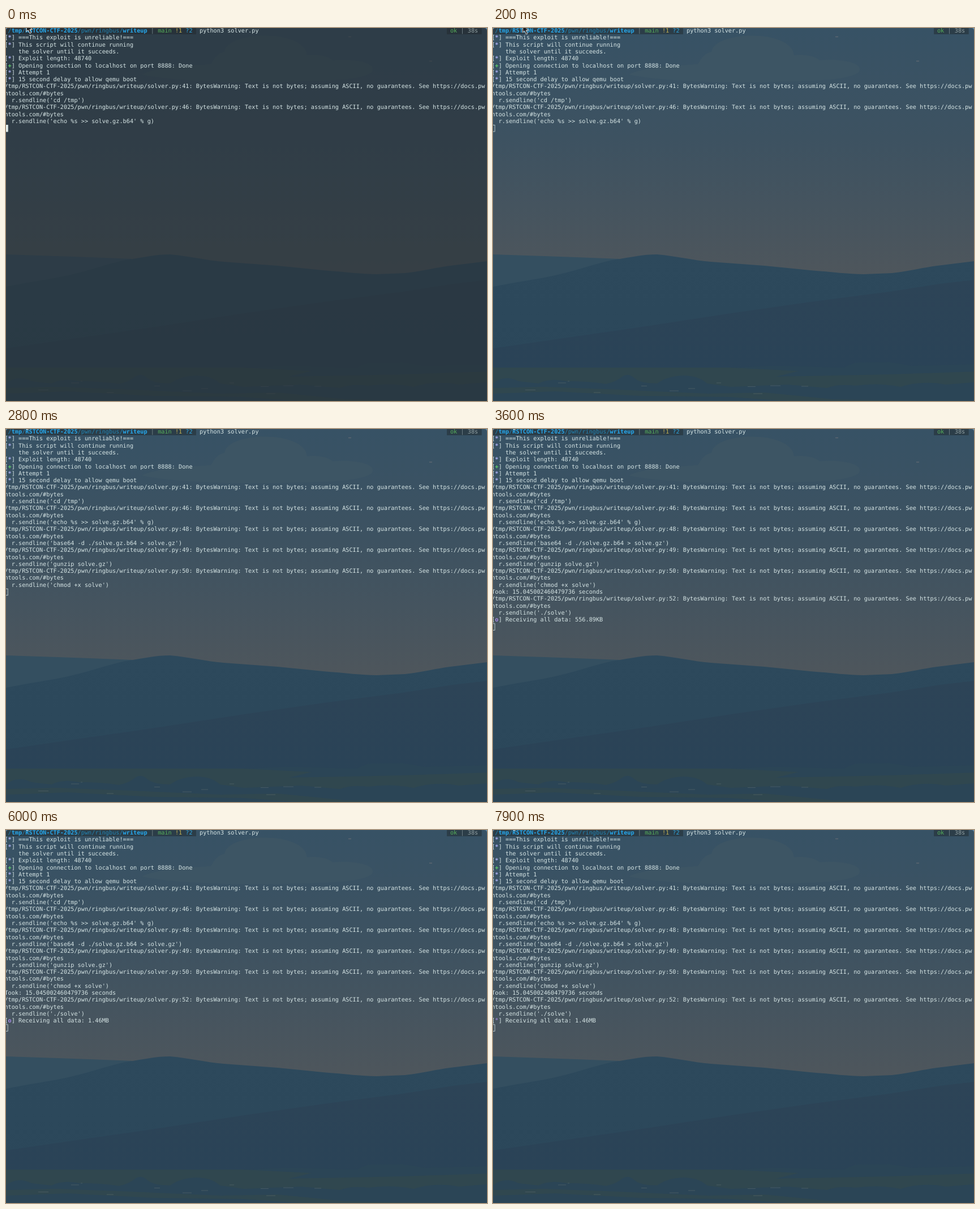
Recreate the animation shown at these times as an HTML page. Size 850 px wide and 659 px high, loop 8 s.

```html
<!DOCTYPE html>
<html lang="en">
<head>
<meta charset="utf-8">
<title>solver.py</title>
<style>
  html, body { margin: 0; width: 100%; height: 100%; overflow: hidden; background: #2b4457; }
  #stage { position: relative; width: 850px; height: 659px; overflow: hidden; }
  #stage > * { position: absolute; left: 0; top: 0; }
  #dim { width: 850px; height: 659px; background: rgba(42,50,57,.64); animation: dim 8s step-end infinite; }
  #term {
    margin: 0; transform-origin: 0 0;
    transform: translate(-2.6px, -.5px) scale(.7694);
    font: 13.29px/16px "DejaVu Sans Mono", monospace;
    font-variant-ligatures: none; text-rendering: geometricPrecision;
    color: #d6e5e5; white-space: pre;
  }
  b { color: #27a9ee; }
  .bar { background: rgba(32,41,44,.5); }
  .dir { color: #2385b4; }
  .sep { color: #75868a; }
  .git { color: #57b05c; }
  .mod { color: #c4b252; }
  .new { color: #2fa6de; }
  .info { color: #a9aef0; font-weight: bold; }
  .good { color: #5fd068; font-weight: bold; }
  .spin { color: #a78be6; font-weight: bold; }
  #caret {
    display: inline-block; box-sizing: border-box; width: 8px; height: 16px; vertical-align: top;
    position: relative; top: -1px;
    border: 1.3px solid #d6e5e5; animation: caret 8s step-end infinite;
  }
  #mouse { overflow: visible; animation: mouse 8s step-end infinite; }
  @keyframes dim { 0% { opacity: 1 } 2.5%, 100% { opacity: 0 } }
  @keyframes caret { 0% { background: #e2ecec } 2.5%, 100% { background: transparent } }
  @keyframes mouse {
    0% { transform: translate(36px, -7px) }
    1.25% { transform: translate(44.5px, -.5px) }
    2.5% { transform: translate(52.5px, -5.5px) }
    10% { transform: translate(56px, -7px) }
    11.25% { transform: translate(36px, -9px) }
    18.75% { transform: translate(43px, -9px) }
    20% { transform: translate(36px, -11px) }
    21.25%, 100% { transform: translate(31px, -15px) }
  }
</style>
</head>
<body>
<div id="stage">
  <svg width="850" height="659" viewBox="0 0 850 659">
    <defs>
      <linearGradient id="sky" x1="0" y1="0" x2="0" y2="435" gradientUnits="userSpaceOnUse">
        <stop offset="0" stop-color="#375265"/>
        <stop offset=".45" stop-color="#3d5261"/>
        <stop offset=".72" stop-color="#45545f"/>
        <stop offset="1" stop-color="#4e565c"/>
      </linearGradient>
      <linearGradient id="ridge" x1="0" y1="400" x2="0" y2="600" gradientUnits="userSpaceOnUse">
        <stop offset="0" stop-color="#2d495c"/>
        <stop offset="1" stop-color="#2b475a"/>
      </linearGradient>
      <linearGradient id="slope" x1="0" y1="445" x2="0" y2="600" gradientUnits="userSpaceOnUse">
        <stop offset="0" stop-color="#2d4457"/>
        <stop offset="1" stop-color="#2a4357"/>
      </linearGradient>
    </defs>
    <path fill="url(#sky)" d="M0 0H850V659H0Z"/>
    <path fill="#3d5564" d="M240 82C270 68 330 66 362 64C370 52 372 46 386 42C392 4 528 2 532 48
      C552 46 570 50 577 57C620 54 650 62 648 74C645 92 560 94 525 94C440 98 300 96 240 82Z"/>
    <path stroke="#5b6670" stroke-width="1.5" d="M605 15.5h5M748 58.5h5"/>
    <path fill="#344f60" d="M0 400L120 404 225 408 270 470H0Z"/>
    <path fill="url(#ridge)" d="M0 457C40 449 70 445 100 439C140 431 175 418 210 410C240 406 262 400 290 400
      C325 403 350 410 385 413L480 420 560 428C600 431 630 435 655 435L705 433C735 430 755 424 785 420L850 412V659H0Z"/>
    <path fill="url(#slope)" d="M850 445L790 452 700 466 560 484 420 504 250 530 0 566V659H850Z"/>
    <path fill="#30474f" d="M0 600H420L520 603 850 598V659H0Z"/>
    <g fill="#2b4556">
      <path d="M420 600L500 597 620 600 640 591 700 590 740 597 850 594V607L700 612 500 616 540 606Z"/>
      <path d="M0 628Q20 612 45 624L80 628Q100 618 130 624Q170 624 200 629Q220 624 228 616Q238 609 248 617Q258 628 290 628
        Q310 614 338 614Q365 615 378 628L420 634 520 630 590 636Q610 628 640 632Q680 626 720 634Q760 622 800 630L850 626V659H760
        L600 656 480 644 380 646 200 638 90 634 0 636Z"/>
      <path d="M0 646L110 642 260 650 420 652 520 659H0Z"/>
    </g>
    <path fill="none" stroke="#5c6a6d" stroke-width="1.2" opacity=".55"
      d="M57 639.500h18M115 627h14M132 624h3M178 644h12M262 632.500h10M312 641h16M345 637h12M395 627h8M450 633.500h14M490 632h18M545 633h12M460 646h16"/>
  </svg>
  <div id="dim"></div>
  <pre id="term"><span class="bar"> <span class="dir">/<b>tmp</b>/<b>RSTCON-CTF-2025</b>/pwn/ringbus/<b>writeup</b></span> <span class="sep">|</span> <span class="git">main</span> <span class="mod">!1</span> <span class="new">?2</span> </span> python3 solver.py<span id="gap"></span><span class="bar"> <span class="git">ok</span> <span class="sep">|</span> <span style="color:#92a1a3">38s</span> </span>
<span id="out"></span><span id="caret"></span></pre>
  <svg width="850" height="6" fill="#6695b8"><path d="M0 0H4Q0 0 0 4ZM850 0V5Q850 0 845 0Z"/></svg>
  <svg id="mouse" width="12" height="18">
    <path d="M0 0V13.5L3.2 10.600 6 16.500 8.600 15.300 6 9.600H10.500Z" fill="#1a1d20" stroke="#f4f6f6"/>
  </svg>
</div>
<script>
  const out = document.getElementById('out');
  document.getElementById('gap').textContent = ' '.repeat(54);

  const tag = (kind, mark, text) => `[<span class="${kind}">${mark}</span>] ${text}\n`;
  const warn = (line, cmd) =>
    `/tmp/RSTCON-CTF-2025/pwn/ringbus/writeup/solver.py:${line}: BytesWarning: Text is not bytes; ` +
    `assuming ASCII, no guarantees. See https://docs.pw\nntools.com/#bytes\n  r.sendline(${cmd})\n`;

  const intro =
    tag('info', '*', '===This exploit is unreliable!===') +
    tag('info', '*', 'This script will continue running') +
    '    the solver until it succeeds.\n' +
    tag('info', '*', 'Exploit length: 48740') +
    tag('good', '+', 'Opening connection to localhost on port 8888: Done') +
    tag('info', '*', 'Attempt 1') +
    tag('info', '*', '15 second delay to allow qemu boot') +
    warn(41, "'cd /tmp'") +
    warn(46, "'echo %s &gt;&gt; solve.gz.b64' % g");
  const unpack =
    warn(48, "'base64 -d ./solve.gz.b64 &gt; solve.gz'") +
    warn(49, "'gunzip solve.gz'") +
    warn(50, "'chmod +x solve'");
  const launch = 'Took: 15.045002460479736 seconds\n' + warn(52, "'./solve'");
  const spinner = ['o', '°', ' ', ' ', '_', '.'];

  // Received kilobytes at a tick of 100 ms
  function received(tick) {
    const kb = tick <= 36 ? 556.89 * (tick - 29) / 7
                          : 556.89 + 52.15 * (Math.min(tick, 54) - 36);
    if (kb <= 0) return '0B';
    return kb < 1024 ? kb.toFixed(2) + 'KB' : (kb / 1024).toFixed(2) + 'MB';
  }

  function screen(tick) {
    let s = intro;
    if (tick >= 28) s += unpack;
    if (tick >= 29) s += launch + tag('spin', spinner[tick % 6], 'Receiving all data: ' + received(tick));
    return s;
  }

  const start = performance.now();
  let shown = '';
  function draw(now) {
    const s = screen(Math.floor(Math.max(0, now - start) % 8000 / 100));
    if (s !== shown) out.innerHTML = shown = s;
    requestAnimationFrame(draw);
  }
  draw(start);
</script>
</body>
</html>
```
